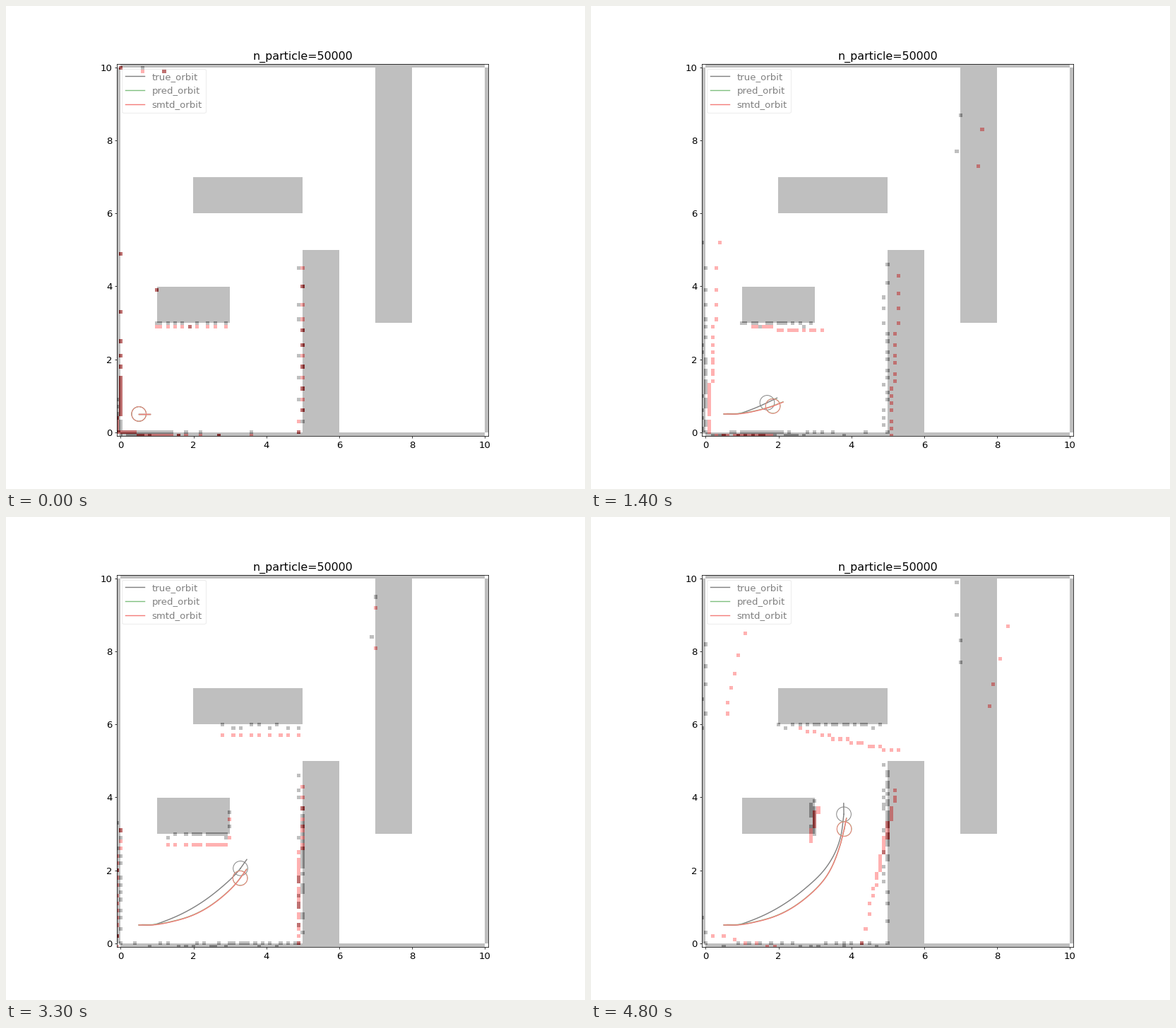
These frames come from a looping animation (820x683 px, 4900 ms). A matplotlib script:

```python
import numpy as np
import matplotlib.pyplot as plt
from matplotlib.animation import FuncAnimation
from matplotlib.patches import Circle

FRAMES, INTERVAL = 49, 100
DPI = 68.3
BEAMS = np.linspace(-np.pi, np.pi, 100)
BLOCKS = [(2, 6, 5, 7), (1, 3, 3, 4), (5, 0, 6, 5), (7, 3, 8, 10)]
BORDER = [(-.1, 0, 0, 10), (10, 0, 10.1, 10), (0, -.1, 10, 0), (0, 10, 10, 10.1)]
GRAY, GREEN, RED = "#808080", "#80c080", "#f47d7a"

# Pose keys: x, y, heading in degrees
KEY_T = np.array([0, 5, 9, 14, 25, 33, 43, 48])
TRUE_KEYS = np.array([
    (.5, .5, 0), (.9, .508, 6), (1.213, .607, 21.95), (1.688, .811, 25.3),
    (2.659, 1.442, 36.2), (3.289, 2.053, 54.5), (3.716, 2.965, 76.45),
    (3.794, 3.538, 90.9)])
SMTD_KEYS = np.array([
    (.5, .5, -1e-6), (.965, .508, 3), (1.35, .578, 14.3), (1.844, .714, 21.7),
    (2.736, 1.228, 38.2), (3.28, 1.781, 53.9), (3.678, 2.645, 70.05),
    (3.804, 3.13, 78.5)])


def hermite(keys, t):
    """Smooth curve through the pose keys."""
    slope = np.gradient(keys, KEY_T, axis=0)
    k = np.clip(np.searchsorted(KEY_T, t, side="right") - 1, 0, len(KEY_T) - 2)
    h = (KEY_T[k + 1] - KEY_T[k])[:, None]
    s = (t - KEY_T[k])[:, None] / h
    return (keys[k] * (1 + 2 * s) * (1 - s) ** 2 + slope[k] * h * s * (1 - s) ** 2
            + keys[k + 1] * s * s * (3 - 2 * s) + slope[k + 1] * h * s * s * (s - 1))


def poses(keys):
    p = hermite(keys, np.arange(FRAMES))
    p[:, 2] = np.radians(p[:, 2])
    return p


def slab(pose, rect):
    """Entry and exit distance of every beam through a rectangle."""
    x, y, a = pose
    dx, dy = np.cos(a + BEAMS), np.sin(a + BEAMS)
    x0, y0, x1, y1 = rect
    tx = np.sort([(x0 - x) / dx, (x1 - x) / dx], axis=0)
    ty = np.sort([(y0 - y) / dy, (y1 - y) / dy], axis=0)
    return np.maximum(tx[0], ty[0]), np.minimum(tx[1], ty[1])


def scan(pose):
    r = slab(pose, (0, 0, 10, 10))[1]
    for block in BLOCKS:
        near, far = slab(pose, block)
        r = np.where((near > 0) & (near < far), np.minimum(r, near), r)
    return r


def hit_mask(pose, r, rng):
    """Hits on the 0.1 grid, drawn as 2x2 half cells."""
    a = pose[2] + BEAMS
    hits = np.array([pose[0] + r * np.cos(a), pose[1] + r * np.sin(a)])
    hits += rng.uniform(-.3, .7, hits.shape) * 1e-9
    col, row = np.floor(hits * 10).astype(int)
    ok = (np.minimum(col, row) >= -1) & (np.maximum(col, row) <= 101)
    col, row = 2 * col[ok] + 2, 2 * row[ok] + 2
    mask = np.zeros((206, 206))
    for i in (0, 1):
        for j in (0, 1):
            mask[row + i, col + j] = 1
    return mask[1:-1, 1:-1]


def wall_mask():
    mask = np.zeros((204, 204))
    for rect in BLOCKS + BORDER:
        x0, y0, x1, y1 = (round((v + .1) * 20) for v in rect)
        mask[y0:y1, x0:x1] = 1
    return mask


WALLS = wall_mask()
TRUE, SMTD = poses(TRUE_KEYS), poses(SMTD_KEYS)
PRED = SMTD + np.outer(np.arange(FRAMES) > 0, (.003, .008, 0))


def grid_image(i):
    rng = np.random.default_rng(i)
    r = scan(TRUE[i])
    seen = hit_mask(TRUE[i], r, rng)
    est = hit_mask(SMTD[i], r, rng)
    img = np.ones((204, 204, 4))
    img[..., :3] -= ((WALLS + seen) * 63.5 / 255)[..., None]
    img[..., 1:3] -= (est * 78 / 255)[..., None]
    img[..., 3] = (WALLS + seen + est) > 0
    return img


plt.rcParams.update({"font.size": 14, "font.family": "DejaVu Sans"})
# The small excess keeps the pixel size from being truncated downwards
fig, ax = plt.subplots(figsize=(820.01 / DPI, 683.01 / DPI), dpi=DPI)
grid = ax.imshow(grid_image(0), extent=(-.1, 10.1, -.1, 10.1), origin="lower",
                 interpolation="nearest", zorder=6)
ax.set(xlim=(-.1, 10.1), ylim=(-.1, 10.1), aspect="equal",
       xticks=range(0, 11, 2), yticks=range(0, 11, 2))
ax.set_title("n_particle=50000")
for spine in ax.spines.values():
    spine.set_zorder(7)


class Robot:
    def __init__(self, track, color, name):
        self.track = track
        self.orbit, = ax.plot([], [], color=color, lw=1.5, label=name)
        self.nose, = ax.plot([], [], color=color, lw=1.5)
        self.body = ax.add_patch(
            Circle((0, 0), .2, fill=False, ec=color, lw=1, zorder=2))

    def move(self, i):
        x, y, a = self.track[i]
        self.orbit.set_data(self.track[:i + 1, 0], self.track[:i + 1, 1])
        self.nose.set_data([x, x + .3 * np.cos(a)], [y, y + .3 * np.sin(a)])
        self.body.center = x, y


robots = [Robot(TRUE, GRAY, "true_orbit"), Robot(PRED, GREEN, "pred_orbit"),
          Robot(SMTD, RED, "smtd_orbit")]
ax.legend(loc="upper left", labelcolor=GRAY, edgecolor="#ebebeb", framealpha=1)


def draw(i):
    grid.set_data(grid_image(i))
    for robot in robots:
        robot.move(i)
    return [grid]


anim = FuncAnimation(fig, draw, frames=FRAMES, interval=INTERVAL,
                     repeat=True, repeat_delay=0)
plt.show()
```
